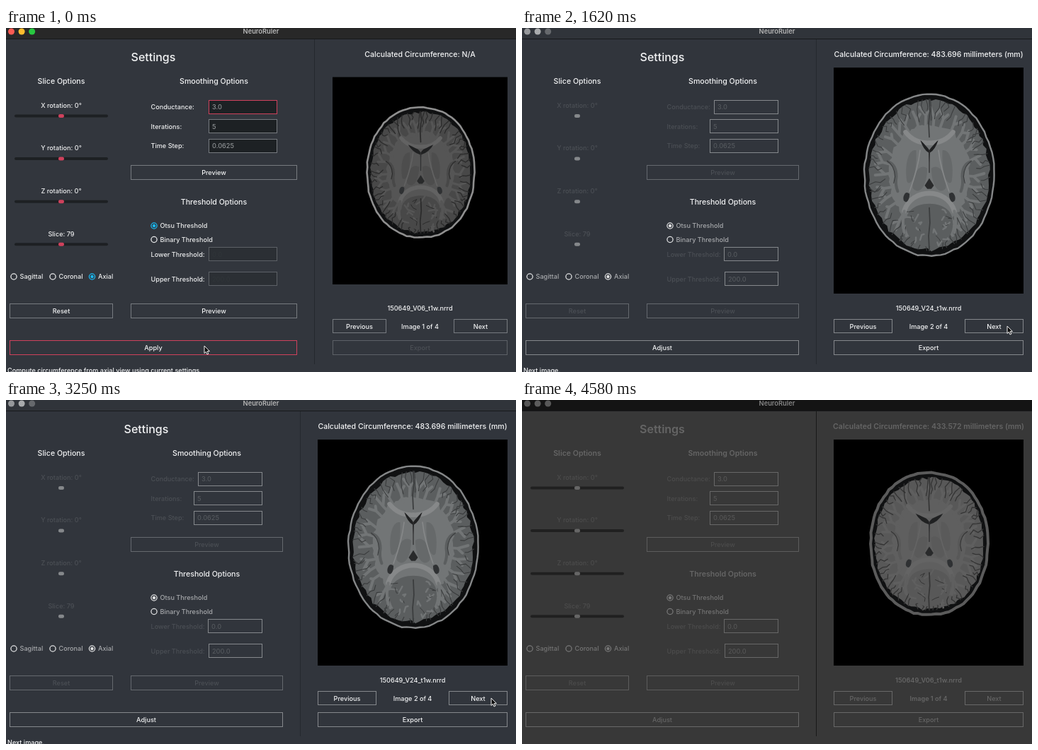
These frames come from a looping animation (720 by 487 pixels, 4.6 s). An HTML page:

```html
<!DOCTYPE html>
<html lang="en">
<head>
<meta charset="utf-8">
<title>NeuroRuler</title>
<style>
  html, body { margin: 0; width: 100%; height: 100%; overflow: hidden; background: #30343b; }
  svg { display: block; width: 720px; height: 487px; font-family: Inter, Roboto, sans-serif; }
  text { white-space: pre; }
  .scan { filter: blur(0.65px); }
</style>
</head>
<body>
<svg id="stage" viewBox="0 0 720 487"></svg>
<script>
const LOOP = 4600;
const RED = '#cf415c';

const THEMES = {
  edit: {
    bg: '#32363d', bar: '#282828', text: '#f2f3f4', label: '#eceded', dim: '#edeeef', value: '#8d9193',
    ghost: '#303539', line: '#777b80', faint: '#5d6167', field: '#1d2124', track: '#1d2023', handle: RED,
    radio: '#e8e9ea', picked: '#1ab9f3', split: '#24282d', dots: ['#fc5b53', '#fdbc2e', '#28c840'], name: '#b9b9b9'
  },
  result: {
    bg: '#31353c', bar: '#272727', text: '#f2f3f4', label: '#a7a9ac', dim: '#4b4f55', value: '#54585d',
    ghost: '#54585d', line: '#85888c', faint: '#65696e', field: 'none', track: '#1e2125', handle: RED,
    radio: '#e0e1e2', picked: '#e0e1e2', split: '#25292e', dots: ['#d5475f', '#e9aab6', '#65676a'], name: '#b5b5b5'
  },
  fade: {
    bg: '#383838', bar: '#141414', text: '#656565', label: '#747474', dim: '#4c4c4c', value: '#555555',
    ghost: '#555555', line: '#686868', faint: '#5c5c5c', field: 'none', track: '#202020', handle: '#666666',
    radio: '#777777', picked: '#777777', split: '#181818', dots: ['#555555', '#5c5c5c', '#585858'], name: '#858585'
  }
};
THEMES.gray = { ...THEMES.result, bar: '#30343a', track: 'none', handle: '#85888b',
  dots: ['#96989b', '#a9abad', '#66696d'] };

// right: edge of the settings pane, left: edge of the image pane
const LAYOUTS = {
  edit: { right: 411, left: 461, split: 435, side: 76, frame: [461, 69.5, 247, 293.5],
    fieldEnd: 383, fields: [286, 286, 286, 286, 286] },
  result: { right: 392, left: 442, split: 417, side: 82, frame: [452, 69.5, 246, 293.5],
    fieldEnd: 363, fields: [271, 267, 267, 285, 286] },
  wide: { right: 391, left: 440, split: 415, side: 83, frame: [440, 56, 268, 320],
    fieldEnd: 362, fields: [271, 265, 265, 285, 286] }
};

const SOFT = { skull: '#8f8f8f', white: '#555555', gray: '#484848', sulcus: '#2b2b2b', light: '#626262', core: '#4d4d4d',
  ring: 2.6, horn: 1.7, round: 0.94, fold: 1.3 };
const CLEAR = { skull: '#858788', white: '#7d8081', gray: '#5b5e5f', sulcus: '#3a3c3d', light: '#8f9192', core: '#66696a',
  ring: 2.4, horn: 1, round: 1, fold: 1.1 };
const SCANS = [
  { size: '433.572', file: '150649_V06_t1w.nrrd', cx: 575, cy: 203.5, a: 84, b: 102, seed: 11, look: SOFT },
  { size: '483.696', file: '150649_V24_t1w.nrrd', cx: 575, cy: 208, a: 93, b: 116.5, seed: 24, look: { ...CLEAR, white: '#727576', light: '#868889' } },
  { size: '493.201', file: '150649_V36_t1w.nrrd', cx: 575.5, cy: 208, a: 95, b: 118.5, seed: 36, look: CLEAR },
  { size: '404.62', file: '152174_V03_t1w.nrrd', cx: 574.5, cy: 199.5, a: 80, b: 91, seed: 43,
    look: { ...SOFT, white: '#4b4e50', gray: '#434648', light: '#616363', skull: '#a0a1a1', core: '#4b4e4f', patch: '#858783', horn: 1.6 } }
];
const FADED = { ...SOFT, skull: '#5b5b5b', white: '#5f5f5f', gray: '#585858', sulcus: '#343434', light: '#646464', core: '#5a5a5a', ring: 4 };

const STATUS = { apply: 'Compute circumference from axial view using current settings', next: 'Next image.', none: '' };

// time, layout, theme, scan, cursor, hovered button
const STEPS = [
  [0, 'edit', 'edit', 0, [280, 450], 'apply'],
  [440, 'result', 'result', 0, [280, 450], 'apply'],
  [590, 'result', 'result', 0, [330, 448], 'apply'],
  [740, 'result', 'result', 0, [450, 440], 'none'],
  [880, 'result', 'result', 0, [580, 430], 'none'],
  [1030, 'result', 'result', 0, [660, 424], 'next'],
  [1180, 'result', 'result', 0, [685, 422], 'next'],
  [1320, 'wide', 'gray', 1, [685, 422], 'next'],
  [1770, 'wide', 'gray', 2, [685, 422], 'next'],
  [2210, 'wide', 'gray', 3, [685, 422], 'next'],
  [2660, 'wide', 'gray', 0, [685, 422], 'next'],
  [2960, 'wide', 'gray', 1, [685, 422], 'next'],
  [3550, 'wide', 'gray', 2, [685, 422], 'next'],
  [4000, 'wide', 'gray', 3, [685, 422], 'next'],
  [4440, 'wide', 'gray', 0, [685, 422], 'next'],
  [4580, 'wide', 'fade', 0, null, 'none']
];

const rect = (x, y, w, h, fill, stroke = 'none') =>
  `<rect x="${x}" y="${y}" width="${w}" height="${h}" fill="${fill}" stroke="${stroke}"/>`;
const circle = (x, y, r, fill, stroke = 'none') =>
  `<circle cx="${x}" cy="${y}" r="${r}" fill="${fill}" stroke="${stroke}" stroke-width="1.3"/>`;
const label = (x, y, str, fill, size = 9.15, anchor = 'start', weight = 500) =>
  `<text x="${x}" y="${y + size * 0.36}" fill="${fill}" font-size="${size}" text-anchor="${anchor}" font-weight="${weight}">${str}</text>`;
const centered = (x, y, str, fill, size, weight) => label(x, y, str, fill, size, 'middle', weight);
const stroke = (d, color, width, extra = '') =>
  `<path d="${d}" fill="none" stroke="${color}" stroke-width="${width}" stroke-linecap="round" stroke-linejoin="round" ${extra}/>`;
const fill = (d, color) => `<path d="${d}" fill="${color}"/>`;

function button(x0, x1, y, str, color, line, height = 20) {
  return rect(x0 + 0.5, y + 0.5, x1 - x0 - 1, height, 'none', line) + centered((x0 + x1) / 2, y + 10.5, str, color);
}

function seeded(seed) {
  let s = seed * 7919;
  return () => (s = (s * 16807) % 2147483647) / 2147483647;
}

function brain({ cx, cy, a, b, seed, look }, contour) {
  const rnd = seeded(seed);
  const jitter = n => (rnd() - 0.5) * n;
  const soft = v => Math.sign(v) * Math.abs(v) ** look.round;
  const at = (x, y) => `${(cx + x * a).toFixed(1)} ${(cy + y * b).toFixed(1)}`;
  const polar = (angle, r) => at(r * soft(Math.cos(angle)), r * soft(Math.sin(angle)));
  const ring = (r, rough) => 'M' + Array.from({ length: 90 }, (_, i) =>
    polar(i * Math.PI / 45, r + jitter(rough))).join('L') + 'Z';
  // maps unit "x,y" pairs to the stage
  const shape = (d, side = 1) => d.replace(/(-?[\d.]+),(-?[\d.]+)/g, (_, x, y) => at(x * side, +y));
  const both = draw => draw(1) + draw(-1);

  const outer = ring(0.985, 0.015);
  let out = fill(outer, '#101112') + stroke(outer, look.skull, look.ring);
  out += fill(ring(0.91, 0.04), look.gray) + fill(ring(0.62, 0.05), look.white);

  // white matter fingers, forked towards the rim, with sulci between them
  const count = 30;
  let fingers = '', sulci = '';
  for (let i = 0; i < count; i++) {
    const angle = (i + jitter(0.5)) * 2 * Math.PI / count;
    const fork = polar(angle + jitter(0.08), 0.7 + jitter(0.06));
    fingers += `M${polar(angle, 0.56)}L${fork}L${polar(angle - 0.06 + jitter(0.06), 0.81 + jitter(0.06))}`;
    fingers += `M${fork}L${polar(angle + 0.08 + jitter(0.06), 0.78 + jitter(0.06))}`;
    for (const shift of [0.05, 0.15]) {
      const depth = 0.08 + rnd() * 0.18;
      sulci += 'M' + [0, 0.4, 0.7, 1].map(k => polar(angle + shift + jitter(0.08), 0.92 - depth * k)).join('L');
    }
  }
  out += stroke(fingers, look.white, a * 0.042) + stroke(sulci, look.sulcus, look.fold);

  // deep gray matter and white matter bands
  out += both(s => stroke(shape('M.62,-.16Q.5,-.12 .5,.02Q.52,.12 .48,.2', s), look.gray, 4));
  out += both(s => stroke(shape('M.64,-.17Q.53,-.12 .52,.02L.54,.1', s), look.sulcus, 1.1));
  out += both(s => fill(shape('M.2,-.3C.32,-.32 .38,-.12 .34,.08C.28,.16 .18,-.02 .2,-.3Z', s), look.core));
  out += both(s => fill(shape('M.03,-.08C.16,-.16 .27,.02 .25,.16C.18,.24 .04,.18 .03,-.08Z', s), look.core));
  out += both(s => stroke(shape('M.14,-.3Q.17,-.08 .3,.2', s), look.light, 1.6));
  if (look.patch) out += both(s => `<g opacity=".5">${fill(shape('M.26,-.2Q.36,-.05 .34,.14Q.48,.06 .46,.15Q.3,.24 .28,.04Z', s), look.patch)}</g>`);
  out += stroke(shape('M-.36,-.52Q-.22,-.38 0,-.39Q.22,-.38 .36,-.52'), look.light, a * 0.07);

  // back of the head
  out += fill(shape('M-.34,.5C-.26,.3 .26,.3 .34,.5C.42,.74 .2,.87 0,.87C-.2,.87 -.42,.74 -.34,.5Z'), look.gray);
  for (let i = 0; i < 20; i++) {
    const x = 0.06 + rnd() * 0.22, y = 0.44 + i * 0.02;
    const d = `M${x},${y}l${jitter(18)} ${jitter(10)}l${jitter(10)} ${jitter(16)}`;
    out += stroke(shape(d.replace(/l.*/, ''), i % 2 ? 1 : -1) + d.replace(/^[^l]*/, ''),
      i % 3 ? look.white : look.sulcus, i % 3 ? 2.4 : 1);
  }
  out += stroke(shape('M-.38,.44C-.28,.15 .28,.15 .38,.44'), look.light, a * 0.075);
  out += both(s => stroke(shape('M.38,.44Q.42,.58 .38,.7', s), look.white, 4));

  // ventricles and fissures
  const horn = 0.085 * look.horn;
  out += both(s => fill(shape(`M.01,-.27Q${horn},-.3 ${horn * 1.6},-.42Q${horn * 1.2},-.4 .05,-.35Q.01,-.32 0,-.3L0,-.15Z`, s), '#202122'));
  out += stroke(shape('M0,-.3L0,-.03'), '#303132', 1.3);
  out += fill(shape('M0,.04L.07,.13L.03,.17L-.03,.17L-.07,.13Z'), '#292a2b');
  out += both(s => fill(shape('M.3,.23Q.36,.19 .39,.26Q.41,.32 .35,.33Q.3,.31 .3,.23Z', s), '#2f3133'));
  out += stroke(shape('M0,-.92L.01,-.78L-.01,-.63L0,-.46M0,.4L.01,.58L-.01,.74L0,.92'), look.sulcus, 1.7);
  return `<g class="scan">${out}</g>` + (contour ? stroke(outer, RED, 1.5, 'stroke-dasharray="4 3"') : '');
}

function slider(y, str, c) {
  return centered(78, y - 15, str, c.dim) +
    `<rect x="12" y="${y - 2}" width="132" height="4" rx="2" fill="${c.track}"/>` +
    `<rect x="74" y="${y - 2.5}" width="8" height="5" rx="2.3" fill="${c.handle}"/>`;
}

function radio(x, y, str, on, c) {
  const color = on ? c.picked : c.radio;
  return circle(x, y, 4.1, 'none', color) + (on ? circle(x, y, 2.2, color) : '') + label(x + 8.5, y, str, c.label);
}

function cursor([x, y]) {
  return `<path transform="translate(${x} ${y})" d="M0 0V10.5L2.4 8.3L4 12L5.8 11.2L4.2 7.6H7.4Z" fill="#0c0c0c" stroke="#f2f2f2" stroke-width="1"/>`;
}

function render([, layoutName, themeName, index, pointer, hover]) {
  const c = THEMES[themeName], p = LAYOUTS[layoutName];
  const editing = layoutName === 'edit', fading = themeName === 'fade';
  const mid = (176 + p.right) / 2, paneMid = (p.left + 708) / 2;
  let scan = SCANS[index];
  if (layoutName !== 'wide') scan = { ...scan, cx: p.frame[0] + p.frame[2] / 2 + 1, cy: 204.5, a: 77, b: 93.5 };
  if (fading) scan = { ...scan, look: FADED };
  const weight = fading ? 600 : 500;
  const off = editing ? c.text : c.dim;
  const offLine = editing ? c.line : c.faint;

  let out = rect(0, 0, 720, 487, c.bg) + rect(0, 0, 720, 15, c.bar) + rect(0, 15, 720, 1, '#17191b');
  out += c.dots.map((color, i) => circle(7.5 + i * 14.6, 5, 4.5, color)).join('');
  out += centered(360, 4.5, 'NeuroRuler', c.name, 9.3, 600);
  out += rect(p.split, 16, 1, 460, c.split);

  out += centered((5 + p.right) / 2, 41, 'Settings', c.text, 16, weight);
  out += centered(78, 75.5, 'Slice Options', c.text, 10.6, weight);
  out += centered(mid, 75.5, 'Smoothing Options', c.text, 10.6, weight);
  out += centered(mid, 246.5, 'Threshold Options', c.text, 10.6, weight);

  ['X rotation: 0°', 'Y rotation: 0°', 'Z rotation: 0°', 'Slice: 79'].forEach((str, i) => {
    out += slider(124.5 + i * 60.6, str, c);
  });
  out += radio(11, 352, 'Sagittal', false, c) + radio(66, 352, 'Coronal', false, c) + radio(121.5, 352, 'Axial', true, c);
  out += radio(209, 280, 'Otsu Threshold', true, c) + radio(209, 299.5, 'Binary Threshold', false, c);

  [[112, 'Conductance:', '3.0'], [139.5, 'Iterations:', '5'], [167, 'Time Step:', '0.0625'],
    [320.5, 'Lower Threshold:', '0.0'], [355.5, 'Upper Threshold:', '200.0']].forEach(([y, str, value], i) => {
    const x = p.fields[i], threshold = i > 2;
    const line = editing && i === 0 ? RED : threshold && editing ? c.faint : c.line;
    out += label(204.5, y, str, c.dim);
    out += rect(x + 0.5, Math.floor(y) - 9.5, p.fieldEnd - x - 1, 19, threshold && editing ? '#2b2f34' : c.field, line);
    out += label(x + 5, y, value, threshold ? c.ghost : c.value);
  });

  out += button(176, p.right, 194, 'Preview', off, offLine) + button(176, p.right, 390, 'Preview', off, offLine);
  out += button(5, 151, 390, 'Reset', off, offLine);
  out += button(5, p.right, 442, editing ? 'Apply' : 'Adjust', c.text, hover === 'apply' ? RED : c.line);

  const size = editing ? 'N/A' : scan.size + ' millimeters (mm)';
  out += centered(paneMid, 37, 'Calculated Circumference: ' + size, c.text, 10.55, weight);
  out += rect(...p.frame, '#000000') + brain(scan, themeName === 'result');
  out += centered(paneMid, 396.5, scan.file, c.text, 9.15, weight);
  out += button(p.left, p.left + p.side, 412, 'Previous', c.text, c.line, 19);
  out += centered(paneMid, 422.5, `Image ${index + 1} of 4`, c.text, 9.15, weight);
  out += button(708 - p.side, 708, 412, 'Next', c.text, hover === 'next' && themeName === 'result' ? RED : c.line, 19);
  out += button(p.left, 708, 442, 'Export', editing ? '#4b4f55' : c.text, editing ? c.faint : c.line);
  out += label(2, 485, STATUS[hover], c.text);
  if (pointer) out += cursor(pointer);
  return out;
}

const stage = document.getElementById('stage');
const pictures = STEPS.map(render);
const start = performance.now();
let shown = -1;

function tick() {
  const t = (performance.now() - start) % LOOP;
  const step = STEPS.findLastIndex(([time]) => time <= t);
  if (step !== shown) {
    stage.innerHTML = pictures[step];
    shown = step;
  }
  requestAnimationFrame(tick);
}
tick();
</script>
</body>
</html>
```
